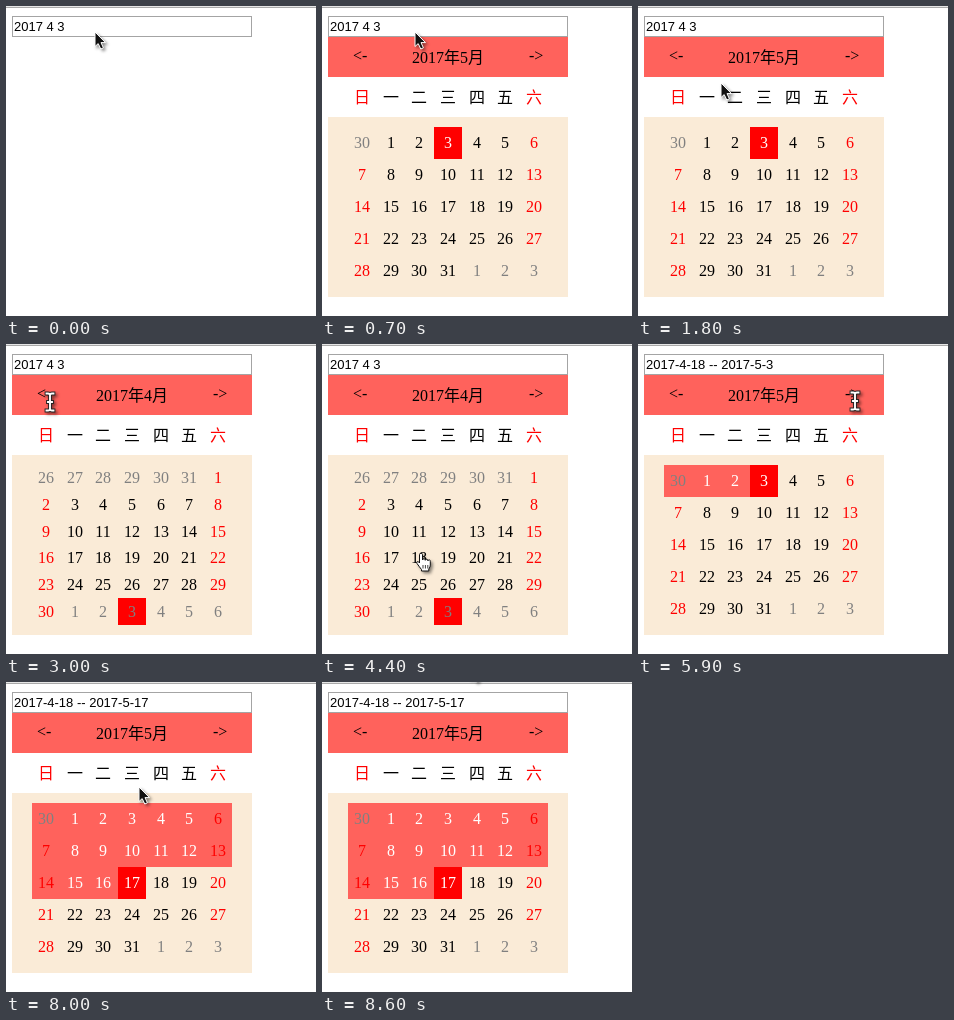
Animation, 310 px wide and 310 px high, one loop 9.2 s. Source, as an HTML page:

```html
<!DOCTYPE html>
<html lang="zh">
<head>
<meta charset="utf-8">
<title>Date range picker</title>
<style>
  html, body { margin: 0; width: 100%; height: 100%; overflow: hidden; background: #fff; }
  svg { display: block; width: 310px; height: 310px; }
  text { font: 16px "Liberation Serif", "Noto Sans CJK SC", "Noto Sans CJK", serif; text-anchor: middle; }
  #field { font: 13px "Liberation Sans", Arial, sans-serif; text-anchor: start; }
  rect { shape-rendering: crispEdges; }
  #pointer { filter: drop-shadow(2px 2px 1.5px rgba(0, 0, 0, .45)); }
</style>
</head>
<body>
<svg viewBox="0 0 310 310">
  <defs>
    <path id="stem" fill="none" d="M-3.5-8.5H-2Q0-8.5 0-7V7Q0 8.5-2 8.5H-3.5M3.5-8.5H2Q0-8.5 0-7M0 7Q0 8.5 2 8.5H3.5M-2 0H2"/>
  </defs>
  <rect width="310" height="1" fill="#e6e6e6"/>
  <rect y="1" width="310" height="1" fill="#a9a9a9"/>
  <rect x="6.5" y="10.5" width="239" height="20" fill="#fff" stroke="#a4a4a4"/>
  <text id="field" x="8" y="25"></text>
  <g id="calendar">
    <rect x="6" y="31" width="240" height="40" fill="#ff625c"/>
    <rect x="6" y="111" width="240" height="180" fill="#faebd7"/>
    <text x="38.2" y="55">&lt;-</text>
    <text id="title" x="126" y="57"></text>
    <text x="214.2" y="55">-&gt;</text>
    <g id="week"></g>
    <g id="days"></g>
  </g>
  <g id="pointer">
    <path id="arrow" d="M0 0V14.5L3.2 11.6L5.8 17L8.4 15.8L6 10.6H10.5Z" fill="#111" stroke="#fff"/>
    <g id="hand" stroke="#111">
      <path fill="#fff" d="M-1.5 9V.7a1.5 1.5 0 0 1 3 0V6a1.4 1.4 0 0 1 2.8 .3a1.3 1.3 0 0 1 2.6 .5a1.2 1.2 0 0 1 2.4 .7V11q0 2-1.5 4V17H.5V15.5q-2-2.5-4.5-6q-1-2 .8-2q.8 0 1.7 1.5Z"/>
      <path fill="none" stroke-width=".8" d="M2 11v3.5M4.4 11v3.5M6.8 11v3.5"/>
    </g>
    <g id="beam" stroke-linecap="square">
      <use href="#stem" stroke="#222" stroke-width="3.8"/>
      <use href="#stem" stroke="#fff" stroke-width="1.9"/>
    </g>
  </g>
</svg>
<script>
const LOOP = 9200, STEP = 100;
const RED = '#f00', PINK = '#ff625c', GREY = '#808080';
const $ = id => document.getElementById(id);
const day = (month, date) => new Date(2017, month - 1, date);

const views = [
  { at: 0, text: '2017 4 3' },
  { at: 600, text: '2017 4 3', month: 5, from: day(5, 3), to: day(5, 3) },
  { at: 2800, text: '2017 4 3', month: 4, from: day(5, 3), to: day(5, 3) },
  { at: 5900, text: '2017-4-18 -- 2017-5-3', month: 5, from: day(4, 18), to: day(5, 3) },
  { at: 7600, text: '2017-4-18 -- 2017-5-17', month: 5, from: day(4, 18), to: day(5, 17) }
];

// Pointer moves: first step, last step, destination
const start = [89, 26];
const moves = [
  [100, 100, 93, 26],
  [900, 1800, 83, 77],
  [1900, 2300, 42, 51],
  [3000, 3700, 95, 215],
  [4400, 5200, 217, 57],
  [6100, 6800, 128, 190],
  [7000, 7000, 122, 197],
  [7600, 8600, 148, -17]
];

const colX = c => Math.round(26 + c * 200 / 7);
const label = (x, y, fill, s) => `<text x="${x}" y="${y}" fill="${fill}">${s}</text>`;
const weekend = c => c === 0 || c === 6;

$('week').innerHTML = [...'日一二三四五六']
  .map((s, c) => label(colX(c + .5), 97, weekend(c) ? RED : '#000', s)).join('');

function drawView({ text, month, from, to }) {
  $('field').textContent = text;
  $('calendar').style.display = month ? '' : 'none';
  if (!month) return;
  $('title').textContent = `2017年${month}月`;
  const offset = day(month, 1).getDay();
  const rows = Math.ceil((offset + day(month + 1, 0).getDate()) / 7);
  const rowY = r => Math.round(121 + r * 160 / rows);
  let html = '';
  for (let i = 0; i < rows * 7; i++) {
    const d = day(month, 1 - offset + i);
    const c = i % 7, r = Math.floor(i / 7);
    const chosen = d >= from && d <= to;
    if (chosen) {
      const x = colX(c), y = rowY(r);
      html += `<rect x="${x}" y="${y}" width="${colX(c + 1) - x}" height="${rowY(r + 1) - y}" fill="${+d === +to ? RED : PINK}"/>`;
    }
    const fill = d.getMonth() + 1 !== month ? GREY
      : weekend(c) ? RED : chosen ? '#fff' : '#000';
    html += label(colX(c + .5), rowY(r + .5) + 5, fill, d.getDate());
  }
  $('days').innerHTML = html;
}

function pointerAt(t) {
  let [x, y] = start;
  for (const [first, last, toX, toY] of moves) {
    if (t < first) break;
    const p = Math.min(1, (t - first + STEP) / (last - first + STEP));
    const ease = p * p * (3 - 2 * p);
    x += (toX - x) * ease;
    y += (toY - y) * ease;
  }
  return [Math.round(x), Math.round(y)];
}

function pointerKind(x, y) {
  if (x > 26 && x < 226 && y > 121 && y < 281) return 'hand';
  const onArrow = (x > 30 && x < 47) || (x > 205 && x < 223);
  return onArrow && y > 42 && y < 60 ? 'beam' : 'arrow';
}

let shown;
function frame() {
  const t = Math.floor(performance.now() % LOOP / STEP) * STEP;
  const view = views.findLast(v => v.at <= t);
  if (view !== shown) drawView(shown = view);
  const [x, y] = pointerAt(t);
  const kind = pointerKind(x, y);
  $('pointer').setAttribute('transform', `translate(${x} ${y})`);
  for (const id of ['arrow', 'hand', 'beam']) $(id).style.display = id === kind ? '' : 'none';
  requestAnimationFrame(frame);
}
frame();
</script>
</body>
</html>
```
